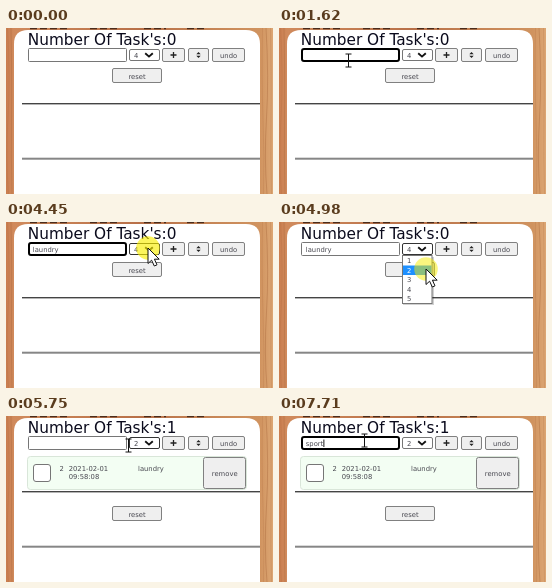
Recreate the animation shown at these times as an HTML page. Size 267x166 px, loop 8 s.

```html
<!DOCTYPE html>
<html lang="en">
<head>
<meta charset="utf-8">
<title>Task list</title>
<style>
  html, body { margin: 0; width: 100%; height: 100%; overflow: hidden; background: #cf8d60; }
  svg { display: block; width: 267px; height: 166px; }
  text { font: 6.8px "DejaVu Sans", sans-serif; fill: #484850; white-space: pre; }
  .title { font-size: 15.3px; fill: #0a0a1c; }
  .mid { text-anchor: middle; }
  .btn { fill: #efefef; stroke: #808080; }
  .field { fill: #fff; stroke: #767676; }
</style>
</head>
<body>
<svg viewBox="0 0 267 166">
  <defs>
    <linearGradient id="wood">
      <stop offset="0" stop-color="#c97d4f"/>
      <stop offset=".03" stop-color="#d08a5c"/>
      <stop offset=".5" stop-color="#b87048"/>
      <stop offset=".95" stop-color="#d0935f"/>
      <stop offset="1" stop-color="#dca673"/>
    </linearGradient>
  </defs>
  <rect width="267" height="166" fill="url(#wood)"/>
  <g id="grain" fill="none" stroke="#a8683c" stroke-width=".9"></g>
  <path d="M24 .6H62M84 .6H112M138 .6H160M181 .6H198" stroke="#4a2c1c" stroke-width="1.2" stroke-dasharray="7 3"/>
  <path d="M8 166V16Q8 2 22 2H240Q254 2 254 16V166Z" fill="#fff"/>

  <text class="title" x="21.8" y="17">Number Of Task's:<tspan id="count">0</tspan></text>
  <rect id="box" class="field"/>
  <text id="typed" x="26.8" y="30"></text>
  <path id="caret" d="M0 23.5V31" stroke="#000" stroke-width=".9"/>

  <rect id="select" class="field" x="123.5" y="21.5" width="30" height="11" rx="1.5"/>
  <text id="value" x="128" y="30">4</text>
  <path d="M139.2 25.2L143 28.6L146.8 25.2" fill="none" stroke="#111" stroke-width="1.9"/>
  <g id="buttons"></g>
  <path d="M167.5 24V30M164.5 27H170.5" stroke="#222" stroke-width="1.3"/>
  <path d="M190.3 26.3L192.5 24L194.7 26.3ZM190.3 27.7L192.5 30L194.7 27.7Z" fill="#222"/>

  <g id="reset">
    <rect class="btn" x="106.5" y="40.5" width="49" height="14" rx="1.5"/>
    <text class="mid" x="131" y="51">reset</text>
  </g>
  <rect x="16" y="75" width="238" height="1.4" fill="#444"/>
  <rect x="16" y="129.7" width="238" height="2" fill="#868686"/>

  <g id="task">
    <rect x="21.5" y="40.5" width="219" height="33" rx="3" fill="#f3fef3" stroke="#d9e6d9"/>
    <rect class="field" x="27.5" y="48.5" width="17" height="17" rx="2.5"/>
    <text x="53.5" y="55">2</text>
    <text x="62.7" y="55">2021-02-01</text>
    <text x="62.7" y="63">09:58:08</text>
    <text x="132" y="55">laundry</text>
    <rect class="btn" x="197.5" y="41.5" width="42" height="31" rx="2"/>
    <text class="mid" x="218.7" y="60">remove</text>
  </g>

  <g id="menu">
    <rect x="124" y="35" width="31" height="48" fill="#000" opacity=".18"/>
    <rect x="123.5" y="33.5" width="29.5" height="48" fill="#fff" stroke="#777"/>
    <rect id="pick" x="124" width="28.5" height="9.5" fill="#1e90ff"/>
    <g id="options"></g>
  </g>

  <circle id="halo" r="11.8" fill="#f8ee00"/>
  <path id="arrow" d="M0 0V15.5L3.6 12.2L6.3 18L9 16.8L6.4 11.2H11.2Z" fill="#fff" stroke="#111" stroke-width="1"/>
  <path id="beam" d="M-2.5 -6H3.5M.5 -6V7M-2.5 7H3.5" fill="none" stroke="#111" stroke-width="1"/>
</svg>
<script>
const LOOP = 8000;
const $ = id => document.getElementById(id);
const show = (id, on) => $(id).style.display = on ? '' : 'none';
const set = (id, attrs) => Object.entries(attrs).forEach(([k, v]) => $(id).setAttribute(k, v));
const within = (t, [from, to]) => t >= from && t < to;

// first step, last step, step count, start and end of the pointer
const moves = [
  [690, 1003, 5, 82, 43, 69, 32],
  [3750, 4450, 10, 69, 32, 142, 26],
  [4600, 4830, 4, 142, 26, 147, 47],
  [5060, 5290, 4, 147, 47, 166, 27],
  [5440, 5750, 5, 166, 27, 122, 29],
  [5830, 6060, 4, 122, 29, 85, 24]
];
// from, to, strength
const clicks = [
  [925, 1160, .6], [4380, 4520, .64], [4980, 5060, .5], [5290, 5440, .6], [6060, 6370, .6]
];
const words = [
  ['laundry', [1850, 2020, 2250, 2320, 2490, 2660, 2740], 5370],
  ['sport', [7150, 7230, 7400, 7480, 7710], LOOP]
];
const focus = [[1080, 4520], [6000, LOOP]];
const caretOn = [[1080, 1620], [1850, 3290], [3750, 4250], [6000, 6520], [7080, LOOP]];

const plainBox = { x: 22.5, y: 20.5, width: 98, height: 13, rx: 1, style: '' };
const focusBox = { x: 23, y: 21, width: 97, height: 12, rx: 2, style: 'stroke:#000;stroke-width:2' };

$('buttons').innerHTML = [[156, 22], [182, 20], [206, 32]].map(([x, w]) =>
  `<rect class="btn" x="${x + .5}" y="20.5" width="${w}" height="13" rx="1.5"/>`).join('') +
  '<text class="mid" x="222.6" y="30">undo</text>';

const rowY = n => 34 + (n - 1) * 9.5;
const options = [1, 2, 3, 4, 5].map(n => {
  $('options').insertAdjacentHTML('beforeend', `<text x="128" y="${rowY(n) + 7.2}">${n}</text>`);
  return $('options').lastChild;
});

$('grain').innerHTML = [1.5, 5, 256.5, 260, 264.5].map((x, i) =>
  `<path d="M${x} 0Q${x + 3 - i % 3 * 2} 50 ${x + .5} 90T${x + 1} 166" opacity="${.25 + i % 2 * .2}"/>`).join('');

function pointerAt(t) {
  const move = moves.filter(m => t >= m[0]).pop();
  if (!move) return null;
  const [from, to, steps, x0, y0, x1, y1] = move;
  const k = Math.min(steps, Math.floor((t - from) / (to - from) * (steps - 1) + .03) + 1);
  const p = k / steps, e = p * p * (3 - 2 * p);
  return [x0 + (x1 - x0) * e, y0 + (y1 - y0) * e];
}

function typedAt(t) {
  for (const [word, keys, end] of words) {
    if (t < end) return word.slice(0, keys.filter(k => t >= k).length);
  }
  return '';
}

function drawPointer(t) {
  const pos = pointerAt(t);
  const click = clicks.find(c => within(t, c));
  const [x, y] = pos || [0, 0];
  const open = within(t, [4520, 5060]);
  const overInput = x <= 122 && y > 20 && y < 34;
  const overSelect = x >= 122 && x < 154 && y > 21 && y < 33;
  show('arrow', pos && !overInput);
  show('beam', pos && overInput);
  show('halo', click);
  for (const id of ['arrow', 'beam', 'halo']) set(id, { transform: `translate(${x} ${y})` });
  if (click) set('halo', { opacity: click[2] });
  $('select').style.stroke = pos && (overSelect || open) ? '#333' : '';

  show('menu', open);
  const hover = t < 4600 ? 4 : Math.max(1, Math.min(5, Math.floor((y - 34) / 9.5) + 1));
  set('pick', { y: rowY(hover) });
  options.forEach((el, i) => el.style.fill = i + 1 === hover ? '#fff' : '');
}

function render(t) {
  const added = t >= 5370;
  const focused = focus.some(f => within(t, f));
  $('count').textContent = added ? 1 : 0;
  $('value').textContent = t < 5060 ? 4 : 2;
  show('task', added);
  set('reset', { transform: `translate(0 ${added ? 50 : 0})` });

  $('typed').textContent = typedAt(t);
  set('box', focused ? focusBox : plainBox);
  show('caret', focused && caretOn.some(c => within(t, c)));
  set('caret', { transform: `translate(${27.4 + $('typed').getComputedTextLength()} 0)` });
  drawPointer(t);
}

const start = performance.now();
function tick() {
  render((performance.now() - start) % LOOP);
  requestAnimationFrame(tick);
}
tick();
</script>
</body>
</html>
```
